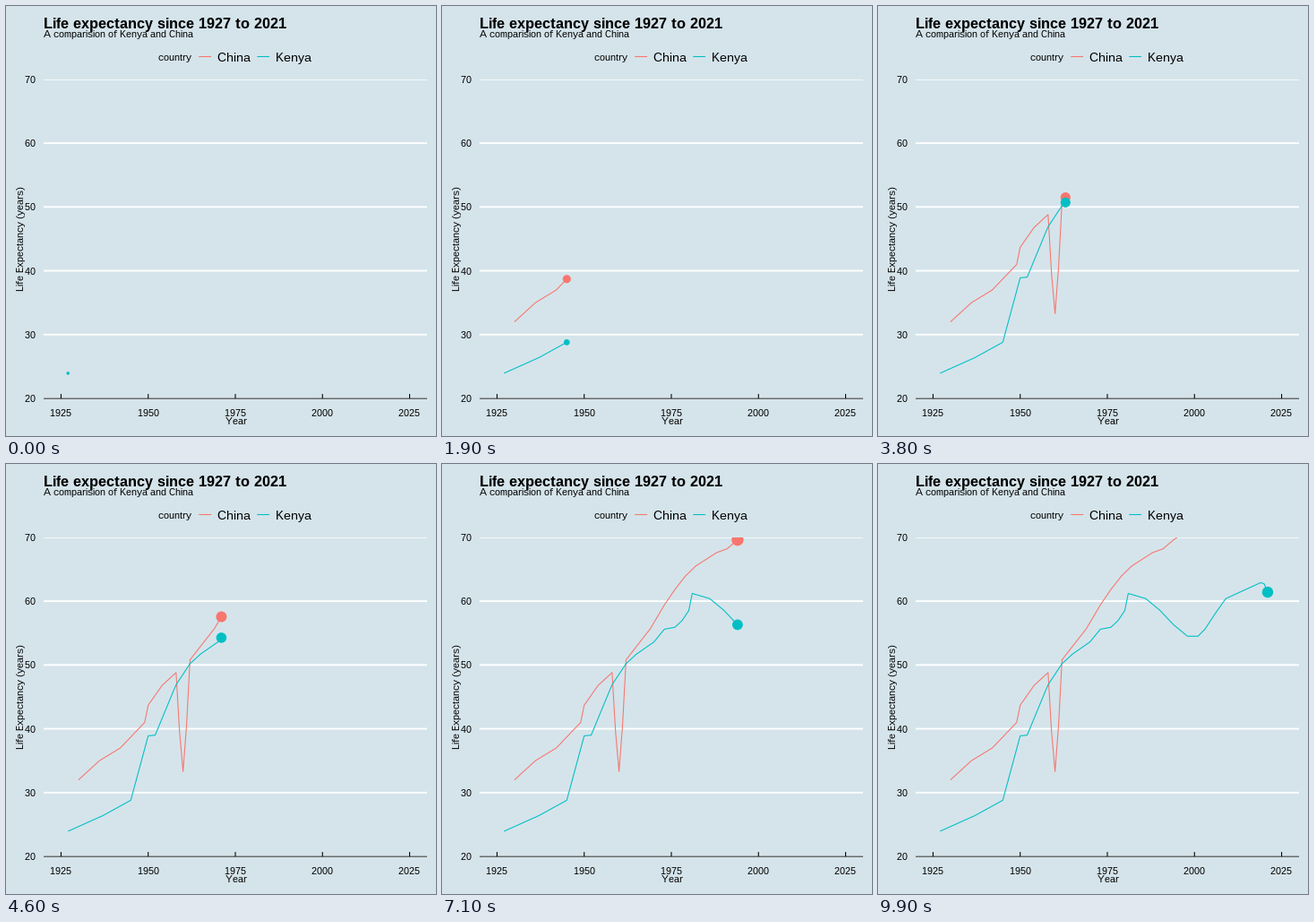
Write a matplotlib script that moves like this. It is 480x480 px and loops after 10000 ms.

```python
import numpy as np
import matplotlib.pyplot as plt
from matplotlib.animation import FuncAnimation
from matplotlib.patches import Circle, Rectangle

plt.rcParams.update({
    "font.family": "Liberation Sans",
    "text.hinting": "default",
    "text.hinting_factor": 1,
})

SIZE, DPI = 480, 72
FRAMES, INTERVAL = 100, 100
START, END, YEARLY = 1927, 2021, 1950
LEFT, RIGHT, TOP, BOTTOM = 42, 470, 81.8, 438.1
BG, RED, TEAL = "#d5e4eb", "#f8766d", "#00bfc4"
LOW, HIGH = 23.95, 78.2

# Turning points of each curve; the years between lie on straight lines.
CHINA = {1930: 32, 1936: 35, 1942: 37, 1949: 41, 1950: 43.7, 1954: 46.8,
         1958: 48.8, 1959: 39.5, 1960: 33.3, 1961: 40.5, 1962: 50.8,
         1969: 55.7, 1973: 59.4, 1976: 61.8, 1979: 63.9, 1982: 65.5,
         1988: 67.6, 1991: 68.2, 1994: 69.6, 2000: 71.9, END: HIGH}
KENYA = {START: LOW, 1937: 26.4, 1945: 28.8, 1950: 38.9, 1952: 39,
         1957: 45.6, 1958: 46.9, 1962: 50.2, 1965: 51.7, 1970: 53.6,
         1973: 55.6, 1976: 55.9, 1978: 56.9, 1980: 58.5, 1981: 61.2,
         1986: 60.4, 1990: 58.6, 1994: 56.3, 1998: 54.5, 2001: 54.5,
         2003: 55.6, 2006: 58.1, 2009: 60.4, 2019: 62.9, 2020: 62.7,
         END: 61.4}


def px(year):
    return LEFT + (year - 1920) * (RIGHT - LEFT) / 110


def py(value):
    return BOTTOM - (value - 20) * (BOTTOM - TOP) / 50


def radius(value):
    """Area scale for point sizes 1 to 6 mm, as a radius in pixels."""
    size = 1 + 5 * np.sqrt((value - LOW) / (HIGH - LOW))
    return 0.375 * (2.845 * size + 0.945) + 0.355


fig = plt.figure(figsize=(SIZE / DPI, SIZE / DPI), dpi=DPI, facecolor=BG)
ax = fig.add_axes([0, 0, 1, 1])
ax.set(xlim=(0, SIZE), ylim=(SIZE, 0))
ax.axis("off")
panel = Rectangle((LEFT, TOP), RIGHT - LEFT, BOTTOM - TOP,
                  transform=ax.transData)


def stroke(x, y, color, width, z=1, clip=False):
    line, = ax.plot(x, y, color=color, lw=width, zorder=z, snap=False,
                    solid_capstyle="butt", solid_joinstyle="round")
    if clip:
        line.set_clip_path(panel)
    return line


def label(x, y, text, size=11, upright=False, **kw):
    # A leading blank keeps the first glyph on the same pixel grid as the rest.
    blank = round(0.278 * size)
    if upright:
        y += blank
    else:
        x -= blank
    ax.text(x, y, "\u00a0" + text, fontsize=size, ha="left", va="baseline",
            rotation=90 if upright else 0, rotation_mode="anchor", **kw)


class Series:
    def __init__(self, knots, color, z):
        early = [year for year in knots if year < YEARLY]
        years = np.array(early + list(range(YEARLY, END + 1)))
        values = np.interp(years, list(knots), list(knots.values()))
        # Every row lands on a whole frame; the head glides between rows.
        self.keys = np.rint((FRAMES - 1) * (years - START) / (END - START))
        self.x, self.y, self.r = px(years), py(values), radius(values)
        self.line = stroke([], [], color, 1.07, z, clip=True)
        self.dot = ax.add_patch(Circle((0, 0), 1, fc=color, lw=0, zorder=z + 2))
        self.dot.set_clip_path(panel)

    def show(self, frame):
        visible = frame >= self.keys[0]
        self.line.set_visible(visible)
        self.dot.set_visible(visible)
        x, y, r = (np.interp(frame, self.keys, v)
                   for v in (self.x, self.y, self.r))
        past = self.keys <= frame
        self.line.set_data(np.append(self.x[past], x), np.append(self.y[past], y))
        self.dot.set(center=(x, y), radius=r)


for value in range(20, 71, 10):
    stroke([LEFT, RIGHT], [py(value)] * 2, "white", 1.87, clip=True)
    label(21, round(py(value)) + 4, str(value))
stroke([LEFT, RIGHT], [BOTTOM] * 2, "black", 0.85, 8)
for year in range(1925, 2026, 25):
    stroke([px(year)] * 2, [BOTTOM, BOTTOM - 5], "black", 1.07, 8)
    label(px(year) - 12.2, 458, str(year))

label(42, 25, "Life expectancy since 1927 to 2021", 16.5, weight="bold")
label(42, 35, "A comparision of Kenya and China")
label(245, 467, "Year")
label(20, 318, "Life Expectancy (years)", upright=True)

label(170, 61, "country")
for x, name, color in ((215.3, "China", RED), (280.3, "Kenya", TEAL)):
    stroke([x, x + 13.8], [56.5] * 2, color, 1.07)
    label(x + 20.7, 62, name, 13.75)

series = [Series(CHINA, RED, 3), Series(KENYA, TEAL, 4)]


def update(frame):
    for s in series:
        s.show(frame)
    return []


anim = FuncAnimation(fig, update, frames=FRAMES, interval=INTERVAL,
                     init_func=lambda: [], repeat=True, repeat_delay=0)
plt.show()
```
